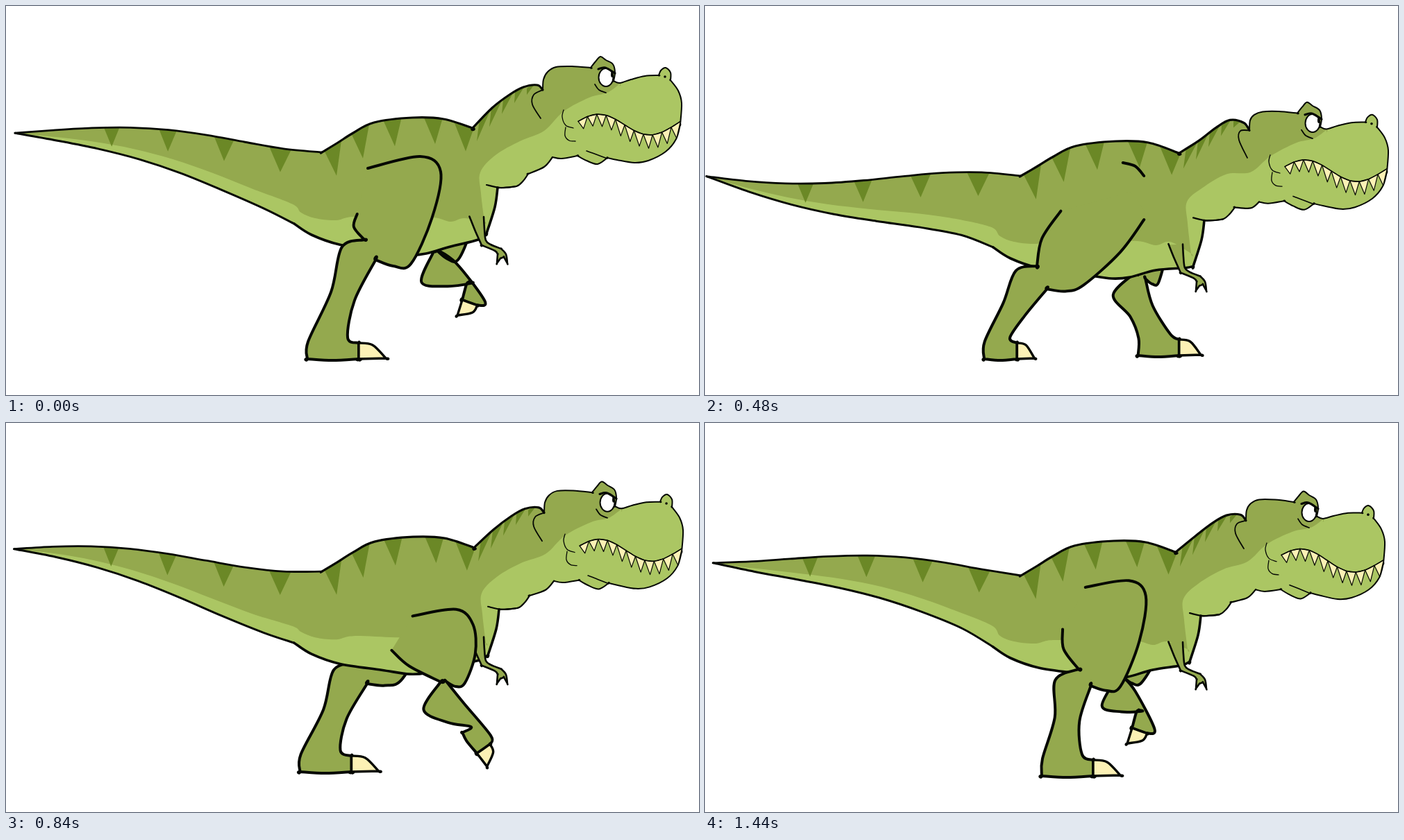
An HTML page with a canvas for the animation above (1520 ms loop, 998x561 px).

```html
<!DOCTYPE html>
<html lang="en">
<head>
<meta charset="utf-8">
<title>Walking dinosaur</title>
<style>
html, body { margin: 0; width: 100%; height: 100%; overflow: hidden; background: #fff; }
canvas { display: block; width: 998px; height: 561px; }
</style>
</head>
<body>
<canvas id="stage" width="998" height="561"></canvas>
<script>
const ctx = document.getElementById('stage').getContext('2d');
const { sin, cos, min, max, abs, hypot, floor, PI } = Math;
const LOOP = 1520, STEP = LOOP / 2;
const SKIN = '#94a94e', LIGHT = '#abc663', STRIPE = '#6b8826', CREAM = '#fcf1b5', INK = '#050803';

const ramp = (x, a, b) => min(1, max(0, (x - a) / (b - a)));
const mix = (p, q, u) => [p[0] + (q[0] - p[0]) * u, p[1] + (q[1] - p[1]) * u];
const range = (n, f) => Array.from({ length: n }, (_, i) => f(i));

// "x,y" pairs; a trailing ! marks a sharp corner (the point is doubled)
const pts = s => s.trim().split(/\s+/).flatMap(w => {
  const p = w.split(',').map(parseFloat);
  return w.endsWith('!') ? [p, p] : [p];
});
const key = (t, ...v) => ({ t, v });

// Periodic monotone cubic interpolation of key poses
function sample(keys, period, t) {
  const n = keys.length;
  const at = j => ({ t: keys[(j + n) % n].t + period * floor(j / n), v: keys[(j + n) % n].v });
  let i = n - 1;
  while (keys[i].t > t) i--;
  const [a, b, c, d] = [at(i - 1), at(i), at(i + 1), at(i + 2)];
  const h = c.t - b.t, u = (t - b.t) / h;
  const slope = (p, q, j) => (q.v[j] - p.v[j]) / (q.t - p.t);
  const mean = (p, q) => p * q > 0 ? 2 * p * q / (p + q) : 0;
  return b.v.map((y, j) => {
    const s = slope(b, c, j), e = c.v[j] - y;
    const m0 = mean(slope(a, b, j), s) * h, m1 = mean(s, slope(c, d, j)) * h;
    return y + u * (m0 + u * (3 * e - 2 * m0 - m1 + u * (m0 + m1 - 2 * e)));
  });
}

// time, body drop, head drop, head shift
const bodyKeys = [
  key(0, 0, 0, 0), key(160, 9.5, 32, 6), key(240, 19, 50, 11), key(480, 34, 66, 11), key(680, 9, 26, 6)
];
// time, knee x y, ankle x y, foot lift, foot length
const legKeys = [
  key(0, 508, 357, 462, 480, 0, 1),
  key(200, 482, 400, 440, 480, 0, 1),
  key(480, 470, 395, 420, 480, 0, 0.64),
  key(680, 585, 392, 632, 423, 1, 0.6),
  key(760, 607, 380, 674, 407, 1, 0.6),
  key(920, 623, 411, 679, 479, 0, 0.64),
  key(1000, 621, 417, 677, 480, 0, 1),
  key(1240, 610, 411, 645, 481, 0, 0.8),
  key(1440, 530, 375, 513, 480, 0, 1)
];

const back = pts(`455,211! 478,197 500,183 530,168 585,161 630,163 672,176!
  700,147 725,128 745,117 765,114 773,121`);
const skull = pts(`773,121 774,106 780,95 792,88 815,87 842,89! 849,80 856,73 864,78 874,84 877,96
  875,108! 884,111 900,106 920,101 940,100! 943,93 950,89 957,96 957,107! 968,122 973,140 971,171!
  965,192 950,210 925,223 905,226 880,222 866,219! 852,228 836,223 823,216! 800,220 787,218`);
const throat = pts('787,218 775,232 752,242! 745,252 735,260 715,262 708,262');
const belly = pts(`708,262 704,290 692,328! 680,337 640,347 605,357 580,359 540,353 480,344
  440,330 415,314`);
const shadeFront = pts(`425,298 445,306 475,309 500,304 560,306 615,305 640,311 660,306 689,311!
  684,270 683,240 705,215 740,195 775,180 803,152 840,132 866,125 884,112! 884,60! 760,60!
  672,120! 560,110! 455,150!`);
const details = [
  [2.2, '735,260 712,262 692,258'], [1.8, '773,121 760,128 758,142 770,162'],
  [1.3, '803,150 801,160 806,172 817,176'], [1.3, '806,175 805,187 811,194 820,195'],
  [1.6, '836,209 850,214 866,220'], [1.8, '848,113 854,121 864,125']
].map(([w, s]) => [w, pts(s)]);
const brow = pts('853,91 863,89 877,97');
const hip = pts('595,192 612,197 624,211');
const arm = pts(`668,305! 676,325 685,345! 704,353 708,358! 707,371! 712,364! 717,362! 722,371!
  720,358 713,350! 698,344 691,338 689,322 688,304`);

const gum = range(12, i => [824 + 13.4 * i, 171 - 15 * sin(2 * PI * (i / 11 + 0.05))]);
const teeth = range(11, i => {
  const [x, y] = mix(gum[i], gum[i + 1], 0.5);
  return [gum[i], gum[i + 1], [x + 1, y + min(20, 14 + 1.5 * i)]];
});

const backStripes = [468, 508, 556, 616, 662].map((x, k) => {
  const y = 161 + 0.0028 * (x - 590) ** 2;
  return [[x - 17, y - 9], [x + 15, y - 9], [x + 8 - 2 * k, y + 42 - 2 * k]];
});
const neckStripes = range(5, k => {
  const x = 690 + 17 * k, y = 114 + 62 * ((765 - x) / 93) ** 1.6;
  return [[x - 8, y + 4], [x + 8, y - 9], [x - 12 + k, y + 37 - 6 * k]];
});

function curve(p, join) {
  join ? ctx.lineTo(...p[0]) : ctx.moveTo(...p[0]);
  for (let i = 0; i < p.length - 1; i++) {
    const a = p[i - 1] || p[i], b = p[i], c = p[i + 1], d = p[i + 2] || c;
    ctx.bezierCurveTo(b[0] + (c[0] - a[0]) / 6, b[1] + (c[1] - a[1]) / 6,
      c[0] - (d[0] - b[0]) / 6, c[1] - (d[1] - b[1]) / 6, c[0], c[1]);
  }
}
function fill(p, color) {
  ctx.beginPath();
  curve(p);
  ctx.fillStyle = color;
  ctx.fill();
}
function line(p, width) {
  ctx.beginPath();
  curve(p);
  ctx.lineWidth = width;
  ctx.stroke();
}
function poly(p, color, width) {
  ctx.beginPath();
  p.forEach(q => ctx.lineTo(...q));
  ctx.closePath();
  ctx.fillStyle = color;
  ctx.fill();
  if (width) { ctx.lineWidth = width; ctx.stroke(); }
}

// Moves a point of the rest pose: the neck follows the head half way
const bender = ([drop, head, shift]) => ([x, y]) => {
  const skullPart = ramp(x, 750, 785);
  const w = 0.42 * ramp(x, 668, 692) + 0.58 * skullPart;
  const tilt = 0.055 * sin(PI * head / 75) * skullPart;
  return [x + shift * ramp(x, 460, 680), y + drop + w * (head - drop) + tilt * (x - 864)];
};

// Tail point: s runs from root to tip, f from upper to lower edge
const tailer = (beat, drop) => (s, f) => {
  const a = 2 * PI * beat / STEP;
  const wave = 26 * sin(2.45 * s) * cos(a - 1.57 - 3.5 * s + 1.15 * s * s);
  return [455 - (448.5 - 6.5 * cos(a)) * s, 211 + drop - 16 * s + wave + 112 * (1 - s) * f];
};

function leg(t) {
  const a = 2 * PI * t / LOOP, swing = cos(a - 0.87), high = max(0, cos(2 * a));
  const [drop] = sample(bodyKeys, STEP, t % STEP);
  const [kx, ky, nx, ny, lift, len] = sample(legKeys, LOOP, t);
  const dx = nx - kx, dy = ny - ky, d = hypot(dx, dy);
  const shin = (u, w) => [kx + dx * u + dy / d * w, ky + dy * u - dx / d * w];
  const c = cos(1.92 * lift), s = sin(1.92 * lift);
  const foot = (x, y) => {
    const fx = x * len, fy = y - 20 * lift;
    return [nx + fx * c - fy * s, ny + fx * s + fy * c];
  };

  const rear = [527 - 33 * swing, 300 - 16 * cos(a) + 16 * cos(2 * a)];
  const fold = [kx + 8, ky - 20];
  const calf = shin(0, 26);
  const bulge = [kx + 59 - 16 * ramp(dx, -30, 30) * 2 + 16, 372 + 0.9 * drop];
  const front = [646 - 31 * swing, 264 - 25 * cos(a) + drop];
  const [rx, ry] = mix(rear, fold, 0.5), [bx, by] = mix(calf, bulge, 0.5);
  const [tx, ty] = mix(bulge, front, 0.5);
  const reach = 20 + 85 * high;
  const heel = foot(-28 * (1 - lift), 29), base = foot(46, 29), cuff = foot(46, 6);

  const edge = [
    rear, [rx - 10, ry], fold, fold, shin(0, -26), shin(0.5, -18),
    foot(-27 * (1 - lift), 4 + 20 * lift), heel, heel, foot(8, 31), base, base, cuff, cuff,
    foot(30, -2), shin(0.5, 18), calf, calf, [bx, by + 6], bulge, [tx + 9, ty], front
  ];
  const cap = [
    [front[0] - 0.28 * reach, front[1] - 22],
    [front[0] - reach, front[1] - 5 - 35 * (1 - high)]
  ];
  fill([...edge, ...cap], SKIN);
  line(t >= 400 && t < 600 ? edge : [...edge, ...cap], 4);

  const tip = foot(85, 28);
  const claw = [cuff, cuff, foot(66, 9), tip, tip, base, base, cuff];
  fill(claw, CREAM);
  line(claw, 3.4);
}

function eye(bend, lid) {
  const [x, y] = bend([864, 103]);
  ctx.save();
  ctx.beginPath();
  ctx.ellipse(x, y, 10.5, 13, 0, 0, 7);
  ctx.fillStyle = '#fff';
  ctx.fill();
  ctx.lineWidth = 2;
  ctx.stroke();
  ctx.clip();
  ctx.fillStyle = INK;
  ctx.beginPath();
  ctx.ellipse(x + 9, y - 4, 2, 4, 0, 0, 7);
  ctx.fill();
  if (lid > 0) {
    const top = y + 13 - 26 * lid;
    ctx.fillStyle = SKIN;
    ctx.fillRect(x - 12, top, 24, 28);
    line([[x - 12, top], [x + 12, top]], 1.5);
  }
  ctx.restore();
  line(brow.map(bend), 3.2);
}

function body(bend, tail, lid, low) {
  const upper = range(9, i => tail(1 - i / 8, 0));
  const lower = [bend([415, 314]), ...range(7, i => tail(0.19 + 0.135 * i, 1))];
  const outline = [
    [2.8, upper], [3.2, back.map(bend)], [2, skull.map(bend)], [2.2, throat.map(bend)],
    [3.6, belly.map(bend)], [3, lower]
  ];
  ctx.save();
  ctx.beginPath();
  outline.forEach(([, p], i) => curve(p, i > 0));
  ctx.fillStyle = LIGHT;
  ctx.fill();
  ctx.clip();
  const shadeTail = range(8, i => tail(1 - i * 0.129, 0.66 + 0.016 * i));
  const above = range(5, i => tail(i / 4, -0.3));
  fill([...shadeTail, ...shadeFront.map(bend), ...above], SKIN);
  for (let k = 0; k < 4; k++) {
    const s = 0.685 - 0.183 * k, w = 0.026 + 0.004 * k;
    poly([tail(s + w, -0.02), tail(s - w, -0.02), tail(s, 0.78 / (1 + 0.4 * k))], STRIPE);
  }
  [...backStripes, ...neckStripes].forEach(p => poly(p.map(bend), STRIPE));
  ctx.restore();

  eye(bend, lid);
  outline.forEach(([w, p]) => line(p, w));
  details.forEach(([w, p]) => line(p.map(bend), w));
  if (low) line(hip.map(bend), 4);

  teeth.forEach(p => poly(p.map(bend), CREAM, 1.2));
  line(gum.map(bend), 1.5);
  ctx.beginPath();
  ctx.arc(...bend([949, 102]), 1.8, 0, 7);
  ctx.fillStyle = INK;
  ctx.fill();
}

function draw(t) {
  const beat = t % STEP, pose = sample(bodyKeys, STEP, beat);
  const bend = bender(pose), tail = tailer(beat, pose[0]);
  const lid = max(0, 1 - abs(t - 730) / 90);

  ctx.fillStyle = '#fff';
  ctx.fillRect(0, 0, 998, 561);
  ctx.strokeStyle = INK;
  ctx.lineJoin = ctx.lineCap = 'round';

  ctx.save();
  ctx.translate(1, -6);
  leg((t + STEP) % LOOP);
  ctx.restore();

  body(bend, tail, lid, beat >= 400 && beat < 600);

  const armDrop = bend([678, 320])[1] - 320;
  const limb = arm.map(([x, y]) => [x, y + armDrop]);
  fill(limb, SKIN);
  line(limb, 2.6);
  leg(t);
}

// Drawn at 25 fps, with a few drawings held twice as long
function tick(now) {
  let t = floor(now % LOOP / 40) * 40;
  if ([40, 200, 1480].includes(t)) t -= 40;
  draw(t);
  requestAnimationFrame(tick);
}
draw(0);
requestAnimationFrame(tick);
</script>
</body>
</html>
```
